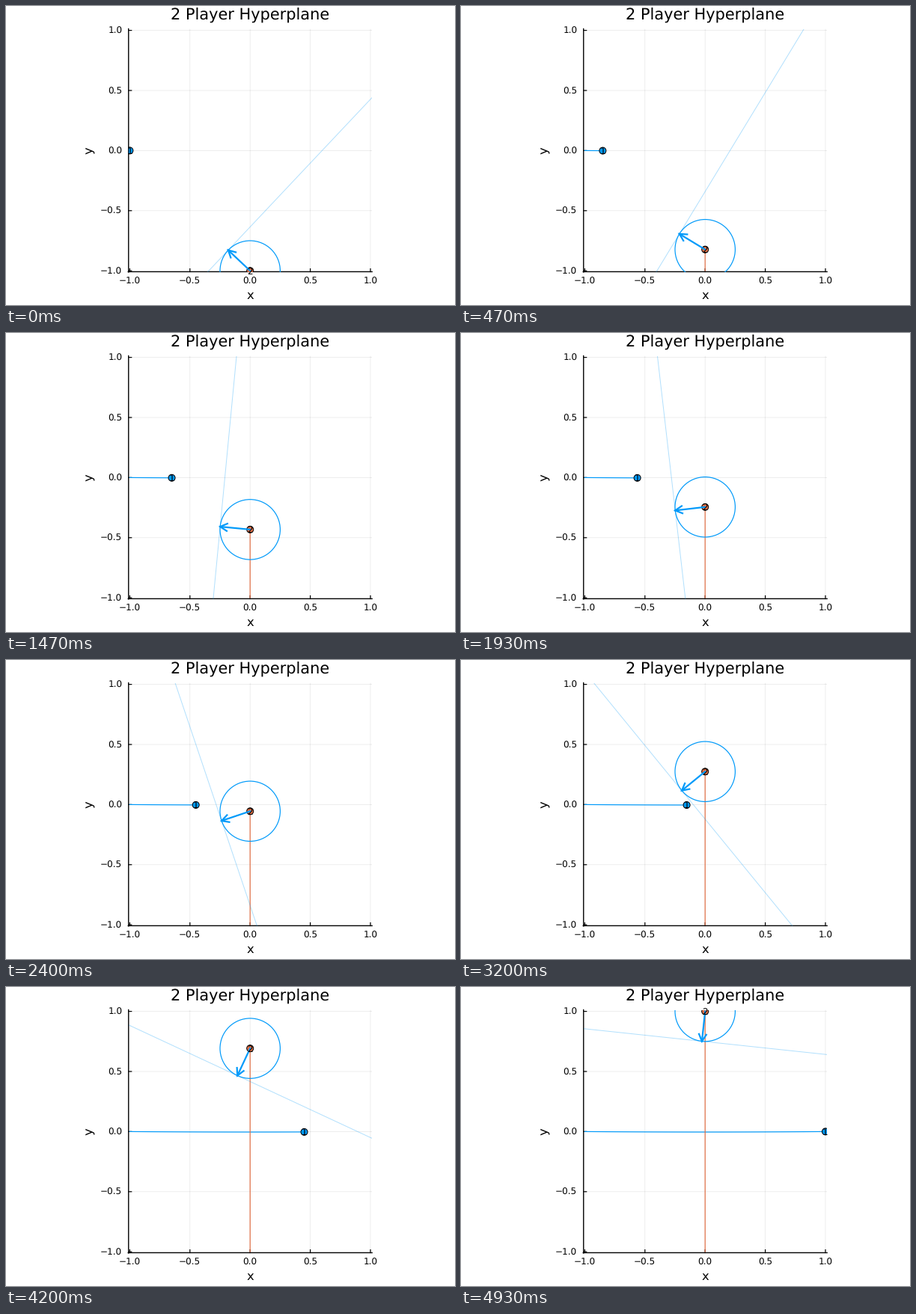
A matplotlib script that plays this animation: 600x400 px, repeating every 4990 ms.

```python
import numpy as np
import matplotlib.pyplot as plt
from matplotlib.animation import FuncAnimation
from matplotlib.patches import Circle, Rectangle

plt.rcParams["font.family"] = "DejaVu Sans"
plt.rcParams["text.hinting"] = "none"

W, H, DPI = 600, 400, 100
FRAMES, LOOP = 75, 4990
PX = 72 / DPI  # points per pixel
BLUE, ORANGE = "#009afa", "#e26f46"
CX, CY, UNIT = 326.2, 193.4, 160.8
LEFT, RIGHT, TOP, BOTTOM = 163.7, 488.7, 31, 355.5
RADIUS = 0.25


def sx(x):
    return CX + UNIT * np.asarray(x)


def sy(y):
    return CY - UNIT * np.asarray(y)


fig = plt.figure(figsize=(W / DPI, H / DPI), dpi=DPI, facecolor="white")
ax = fig.add_axes([0, 0, 1, 1])
ax.set(xlim=(0, W), ylim=(H, 0))
ax.axis("off")
frame = Rectangle((LEFT, TOP), RIGHT - LEFT, BOTTOM - TOP,
                  transform=ax.transData)


def line(xs, ys, color, width, clip=False, **kw):
    art, = ax.plot(xs, ys, color=color, lw=width * PX, snap=False, **kw)
    if clip:
        art.set_clip_path(frame)
    return art


def label(x, y, text, size, ha="center", va="baseline", **kw):
    return ax.text(x, y, text, fontsize=size * PX, ha=ha, va=va,
                   color="black", **kw)


def draw_axes():
    for v in (-1, -0.5, 0, 0.5, 1):
        x, y = sx(v), sy(v)
        line([x, x], [TOP, BOTTOM], "black", 0.7, alpha=0.1, zorder=1)
        line([LEFT, RIGHT], [y, y], "black", 0.7, alpha=0.1, zorder=1)
        line([x, x], [BOTTOM, BOTTOM - 4], "black", 1.2, zorder=1)
        line([LEFT, LEFT + 4], [y, y], "black", 1.2, zorder=1)
        name = f"{v:.1f}".replace("-", "\u2212")
        label(x, 372, name, 12)
        label(155.3, y + 4.4, name, 12, ha="right")
    line([LEFT, LEFT], [TOP - 0.5, BOTTOM + 0.5], "black", 1.35, zorder=1)
    line([LEFT - 0.5, RIGHT + 0.5], [BOTTOM, BOTTOM], "black", 1.35, zorder=1)
    label(CX - 0.3, 19, "2 Player Hyperplane", 20.83)
    label(CX, 392, "x", 16.4)
    label(112, CY, "y", 16.4, va="center", rotation=90)


def player(name, color):
    trail = line([], [], color, 1.2, clip=True, zorder=2)
    dot = Circle((0, 0), 4.5, fc=color, ec="black", lw=PX, zorder=4)
    ax.add_patch(dot)
    dot.set_clip_path(frame)
    return trail, dot, label(0, 0, name, 12, zorder=7)


def place(parts, xs, ys):
    trail, dot, tag = parts
    px, py = sx(xs), sy(ys)
    trail.set_data(px, py)
    dot.center = px[-1], py[-1]
    tag.set_position((px[-1], py[-1] + 4.4))


# Player 1 brakes for the hyperplane, then speeds up; player 2 is near uniform
step = np.arange(FRAMES)
u = step / (FRAMES - 1)
knots = np.array([0, 8, 13, 16, 22, 24, 36, 48, 63, 74]) / (FRAMES - 1)
stops = [-1, -0.835, -0.757, -0.722, -0.65, -0.629, -0.45, -0.1535, 0.45, 1]
x1 = np.polyval(np.polyfit(knots, stops, 6), u)
y1 = -0.004 * (1 - x1 ** 2)
x2 = np.zeros(FRAMES)
y2 = -1 + 2 * u - u * (1 - u) * (0.152 - 0.08 * u)
theta = 3 * np.pi / 4 + 0.03 * (step + 1)

draw_axes()
one = player("1", BLUE)
two = player("2", ORANGE)
plane = line([], [], BLUE, 1, clip=True, alpha=0.3, zorder=3)
ring = Circle((0, 0), RADIUS * UNIT, fill=False, ec=BLUE, lw=1.2 * PX, zorder=5)
ax.add_patch(ring)
ring.set_clip_path(frame)
shaft = line([], [], BLUE, 2.2, clip=True, zorder=6)
head = line([], [], BLUE, 2.2, clip=True, zorder=6, solid_joinstyle="miter")


def update(i):
    place(one, x1[:i + 1], y1[:i + 1])
    place(two, x2[:i + 1], y2[:i + 1])
    a = theta[i]
    c, s = np.cos(a), np.sin(a)
    cx, cy = sx(x2[i]), sy(y2[i])
    tx, ty = cx + RADIUS * UNIT * c, cy - RADIUS * UNIT * s
    ring.center = cx, cy
    shaft.set_data([cx, tx], [cy, ty])
    wings = a + np.pi + np.radians([-28, 28])
    wx, wy = tx + 10.5 * np.cos(wings), ty - 10.5 * np.sin(wings)
    head.set_data([wx[0], tx, wx[1]], [wy[0], ty, wy[1]])
    reach = np.array([-600, 600])
    plane.set_data(tx - reach * s, ty - reach * c)
    return []


anim = FuncAnimation(fig, update, frames=FRAMES, interval=LOOP / FRAMES,
                     init_func=lambda: update(0), repeat=True,
                     repeat_delay=0, blit=False)
plt.show()
```
